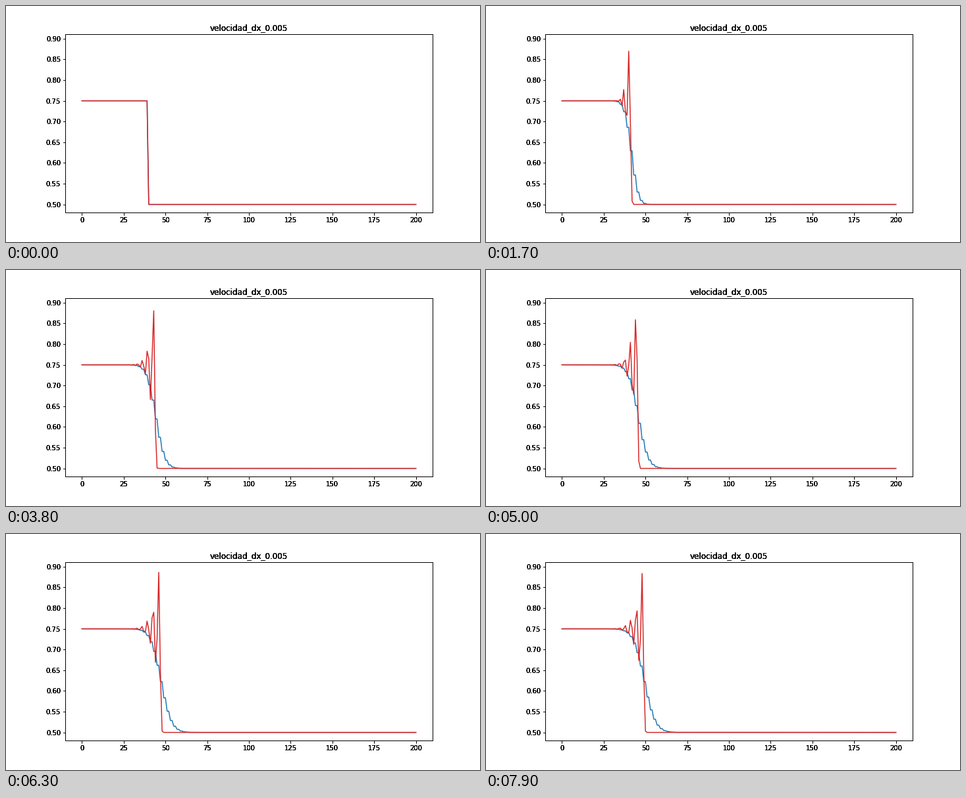
These frames come from a looping animation (720 px wide and 360 px high, 8000 ms). A matplotlib script:

```python
import numpy as np
import matplotlib.pyplot as plt
from matplotlib.animation import FuncAnimation

# Traffic flow with velocity v = 1 - density:  v_t + (v^2 - v)_x = 0
CELLS = 201
FRAMES = 80
RATIO = 0.5  # dt / dx


def flux(v):
    return v * v - v


def lax_friedrichs(v):
    new = v.copy()
    f = flux(v)
    new[1:-1] = (v[2:] + v[:-2]) / 2 - RATIO / 2 * (f[2:] - f[:-2])
    return new


def lax_wendroff(v):
    new = v.copy()
    half = (v[1:] + v[:-1]) / 2 - RATIO / 2 * np.diff(flux(v))
    new[1:-1] -= RATIO * np.diff(flux(half))
    return new


def solve(step):
    states = [np.where(np.arange(CELLS) < 40, 0.75, 0.5)]
    while len(states) < FRAMES:
        states.append(step(states[-1]))
    return np.array(states)


smooth = solve(lax_friedrichs)
sharp = solve(lax_wendroff)
pad = 0.05 * (sharp.max() - 0.5)

plt.rcParams["font.family"] = "DejaVu Sans"
fig = plt.figure(figsize=(10, 5), dpi=72, facecolor="white")


def add_axes(face):
    ax = fig.add_axes([0.125, 0.125, 0.775, 0.755], facecolor=face)
    ax.set_xlim(-10, 210)
    ax.set_ylim(0.5 - pad, sharp.max() + pad)
    ax.set_xticks(range(0, 201, 25))
    ax.set_yticks(np.arange(0.5, 0.91, 0.05))
    ax.yaxis.set_major_formatter("{x:.2f}")
    ax.set_title("velocidad_dx_0.005", fontsize=12)
    return ax


ax = add_axes("white")
x = np.arange(CELLS)
blue, = ax.plot(x, smooth[0], color="tab:blue", lw=1.5)
red, = ax.plot(x, sharp[0], color="tab:red", lw=1.5)

# Overlaid copies give the lettering its heavy edges
for _ in range(3):
    add_axes("none")


def update(i):
    blue.set_ydata(smooth[i])
    red.set_ydata(sharp[i])
    return blue, red


anim = FuncAnimation(fig, update, frames=FRAMES, interval=100,
                     repeat=True, repeat_delay=0, blit=False)
plt.show()
```
